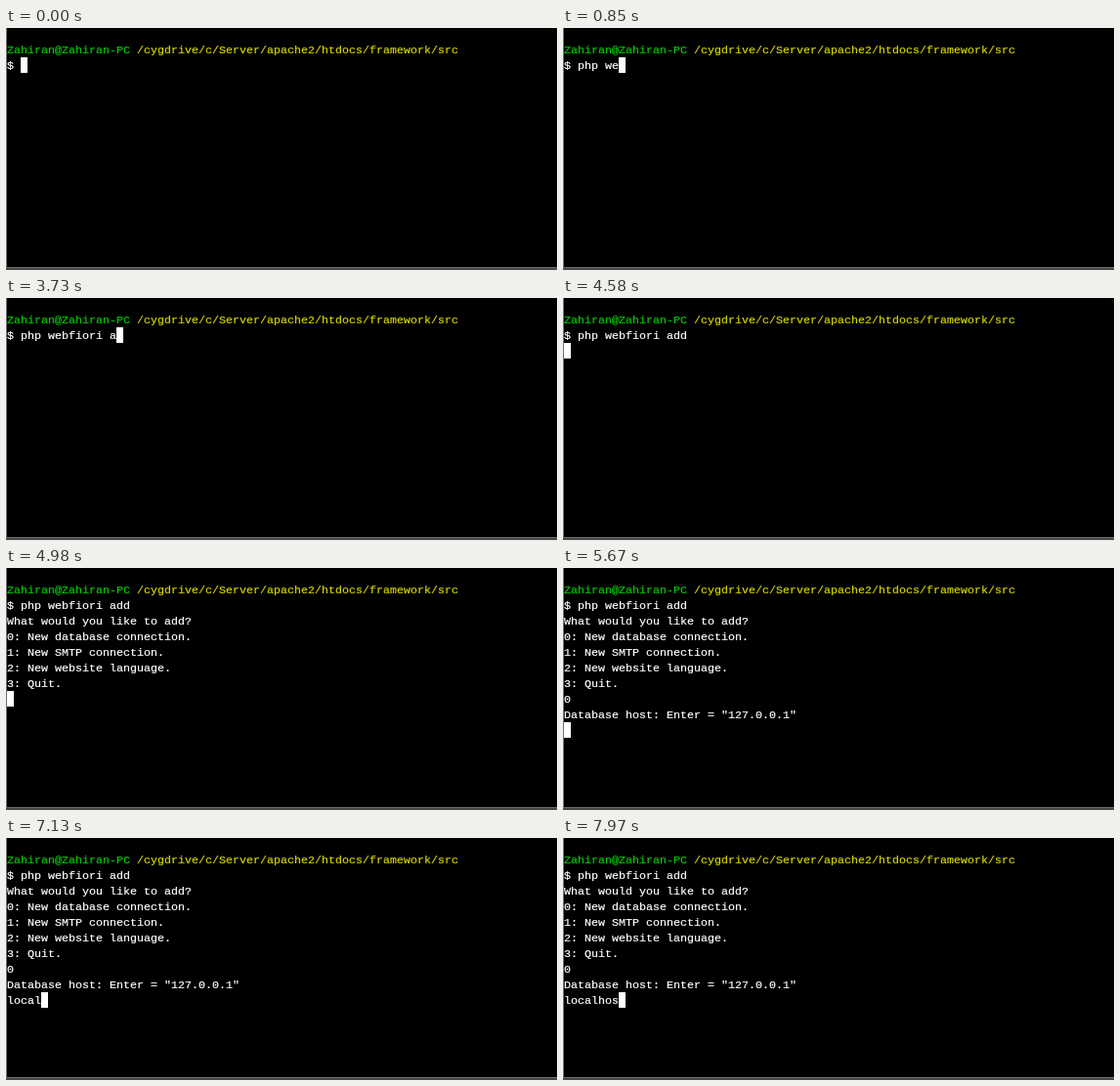
Write an HTML page with a canvas that moves like this. It is 564 by 248 pixels and loops after 8 s.

```html
<!DOCTYPE html>
<html lang="en">
<head>
<meta charset="utf-8">
<title>Terminal session</title>
<style>
  html, body { margin: 0; width: 100%; height: 100%; overflow: hidden; background: #000; }
  canvas { display: block; }
</style>
</head>
<body>
<canvas id="stage" width="564" height="248"></canvas>
<script>
const ctx = document.getElementById("stage").getContext("2d");
const LOOP = 8000;
const CELL = { w: 7, h: 16, x: 1, y: 14, baseline: 12 };
const COLOR = { text: "#fff", user: "#00cc00", path: "#d4d400", edge: "#6e6e6e", frame: "#484848" };
const USER = "Zahiran@Zahiran-PC";
const PATH = "/cygdrive/c/Server/apache2/htdocs/framework/src";
const MENU = [
  "What would you like to add?",
  "0: New database connection.",
  "1: New SMTP connection.",
  "2: New website language.",
  "3: Quit.",
  ""
].join("\n");

// Output appended to the screen at each time in ms
const script = [
  [0, "$ "],
  [80, "p"], [330, "h"], [640, "p"], [700, " w"], [850, "e"],
  [1310, "b"], [1930, "f"], [2390, "i"], [2560, "o"], [3260, "ri"],
  [3410, " "], [3730, "a"], [3960, "d"], [4110, "d"], [4580, "\n"],
  [4980, MENU],
  [5590, "0"], [5670, '\nDatabase host: Enter = "127.0.0.1"\n'],
  [5880, "l"], [6050, "o"], [6520, "c"], [6750, "a"],
  [7130, "l"], [7360, "h"], [7690, "o"], [7970, "s"]
];

const cellX = col => CELL.x + col * CELL.w;
const cellY = row => CELL.y + row * CELL.h;

function rect(color, x, y, w, h) {
  ctx.fillStyle = color;
  ctx.fillRect(x, y, w, h);
}

// A hairline outline gives the letters the solid weight of terminal type
function write(text, col, row, color) {
  ctx.fillStyle = ctx.strokeStyle = color;
  const y = cellY(row) + CELL.baseline;
  [...text].forEach((ch, i) => {
    const x = cellX(col + i);
    ctx.fillText(ch, x, y);
    ctx.strokeText(ch, x, y);
  });
}

function draw(t) {
  rect("#000", 0, 0, 564, 248);
  rect(COLOR.frame, 0, 246, 564, 2);
  rect(COLOR.edge, 0, 245, 564, 1);
  rect(COLOR.edge, 0, 0, 1, 246);

  ctx.font = '11.67px "Liberation Mono", monospace';
  ctx.lineWidth = 0.2;
  write(USER, 0, 0, COLOR.user);
  write(PATH, USER.length + 1, 0, COLOR.path);

  const lines = script.filter(([at]) => at <= t).map(([, text]) => text).join("").split("\n");
  lines.forEach((line, i) => write(line, 0, i + 1, COLOR.text));
  rect(COLOR.text, cellX(lines.at(-1).length), cellY(lines.length), CELL.w, CELL.h);
}

const start = performance.now();
function tick() {
  draw((performance.now() - start) % LOOP);
  requestAnimationFrame(tick);
}
tick();
</script>
</body>
</html>
```
